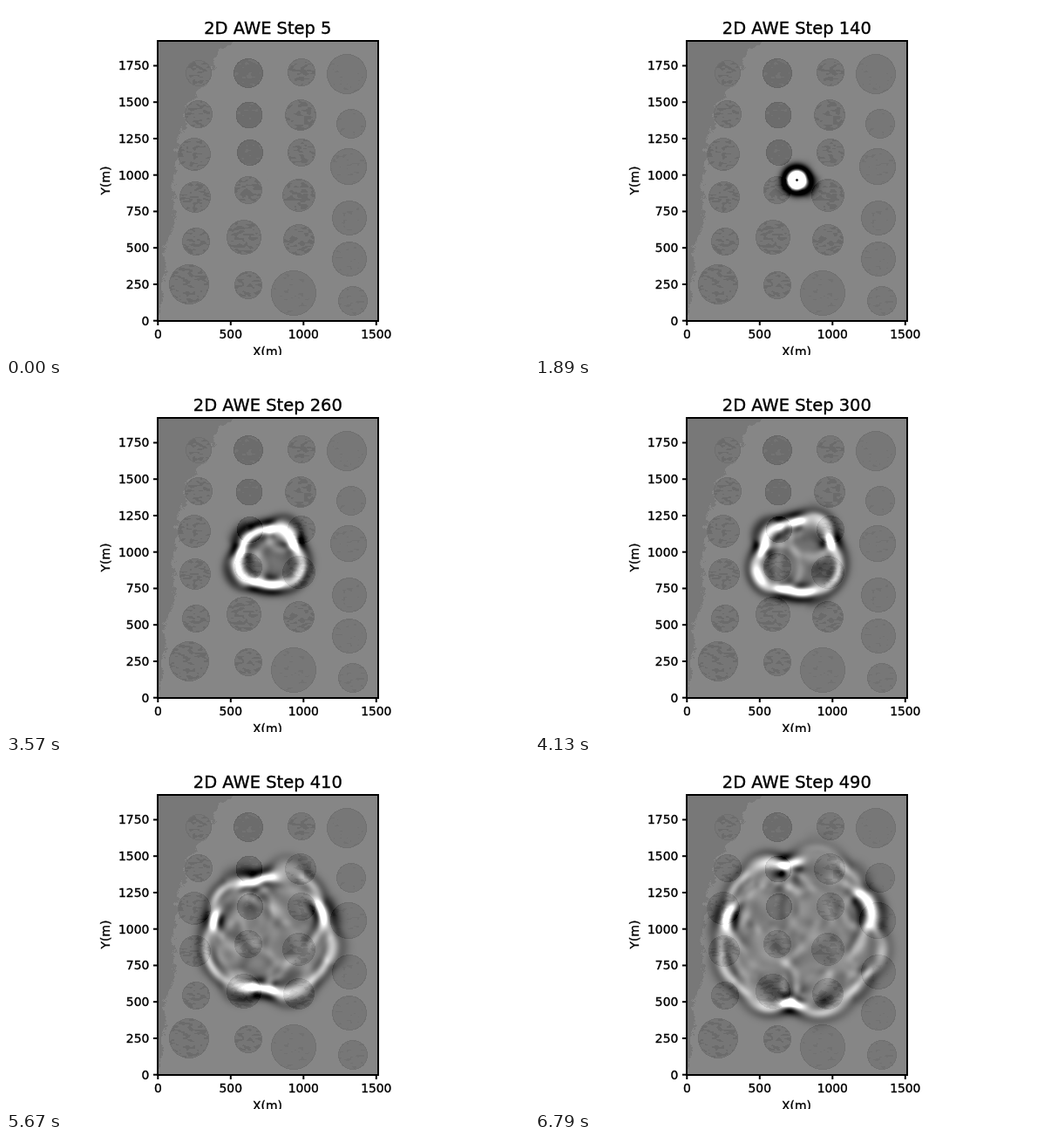
An HTML page with a canvas that plays this animation: 600x400 px, repeating every 6860 ms.

```html
<!DOCTYPE html>
<html lang="en">
<head>
<meta charset="utf-8">
<title>2D acoustic wave</title>
<style>
  html, body { margin: 0; width: 100%; height: 100%; overflow: hidden; background: #fff; }
  canvas { position: absolute; left: 175px; top: 41px; }
  svg { position: absolute; left: 0; top: 0; font-family: "DejaVu Sans", sans-serif; }
  text { stroke: #000; stroke-width: .35px; }
</style>
</head>
<body>
<canvas id="field" width="252" height="320"></canvas>
<svg id="axes" width="600" height="400" viewBox="0 0 600 400"></svg>
<script>
const W = 252, H = 320, LEFT = 175, TOP = 41;
const FRAMES = 98, HOLD = 70, STRIDE = 5;
const PULSE = { x: 125, y: 158 };

// Inclusions by column: centre x, centre y, radius, kind
const LIGHT = 0, MID = 1, DARK = 2;
const discs = [
  [221, 77, 15, MID], [221, 124, 16, MID], [216, 170, 19, MID],
  [217, 219, 18, MID], [218, 270, 16, MID], [210, 319, 23, MID],
  [278, 77, 17, DARK], [279, 125, 15.5, DARK], [280, 168, 15, DARK],
  [278, 211, 16, MID], [273, 265, 20, MID], [278, 320, 16, MID],
  [339, 76, 16, MID], [338, 125, 18, MID], [339, 168, 16, MID],
  [336, 217, 19, MID], [336, 268, 18, MID], [330, 329, 26, LIGHT],
  [391, 78, 23, LIGHT], [396, 135, 17, LIGHT], [393, 184, 21, LIGHT],
  [394, 243, 20, LIGHT], [394, 290, 20, LIGHT], [398, 338, 17, LIGHT]
];
const discSpeed = [0.25, 0.3, 0.34];
const discTone = [119, 118, 108];
const spotTone = [113, 107, 115];
const spotLevel = [0.8, 0.6, 0.72];

// Edge of the darker zone on the left: y, x
const shore = [[40, 264], [50, 246], [60, 239], [72, 238], [85, 232], [100, 221],
  [115, 206], [130, 205], [150, 200], [165, 195], [185, 197], [205, 192],
  [240, 195], [255, 192], [266, 184], [290, 181], [340, 180], [352, 175], [362, 174]];

function shoreAt(y) {
  let i = 0;
  while (shore[i + 1][0] < y) i++;
  const [y0, x0] = shore[i], [y1, x1] = shore[i + 1];
  return x0 + (x1 - x0) * (y - y0) / (y1 - y0);
}

function hash(x, y) {
  let h = Math.imul(x, 374761393) + Math.imul(y, 668265263);
  h = Math.imul(h ^ (h >>> 13), 1274126177);
  return ((h ^ (h >>> 16)) >>> 0) / 4294967296;
}

function noise(x, y) {
  const i = Math.floor(x), j = Math.floor(y), u = x - i, v = y - j;
  const a = hash(i, j) * (1 - u) + hash(i + 1, j) * u;
  const b = hash(i, j + 1) * (1 - u) + hash(i + 1, j + 1) * u;
  return a * (1 - v) + b * v;
}

// The backdrop shows the model; the wave travels through its mirror image.
function buildModel() {
  const tone = new Float32Array(W * H), speed2 = new Float32Array(W * H);
  for (let j = 0; j < H; j++) {
    for (let i = 0; i < W; i++) {
      const x = i + LEFT + 0.5, y = j + TOP + 0.5;
      const rough = (noise(x / 5, y / 5) - 0.5) * 10 + (hash(i, j) - 0.5) * 3;
      let g = x < shoreAt(y) + rough ? 120 : 134;
      let c = 0.197 + 0.03 * (1 - i / W);
      for (const [cx, cy, r, kind] of discs) {
        const d = Math.hypot(x - cx, y - cy);
        if (d > r) continue;
        const spot = noise(x / 4 + 50, y / 1.9) > spotLevel[kind];
        g = d > r - 1 ? discTone[kind] - 7 : spot ? spotTone[kind] : discTone[kind];
        c = discSpeed[kind];
      }
      tone[j * W + i] = g;
      speed2[j * W + W - 1 - i] = c * c;
    }
  }
  return { tone, speed2 };
}

function ricker(n) {
  const a = (Math.PI * 0.0098 * (n - 100)) ** 2;
  return (1 - 2 * a) * Math.exp(-a);
}

// Second-order finite differences, one snapshot every STRIDE steps
function simulate(speed2) {
  let prev = new Float32Array(W * H), cur = new Float32Array(W * H);
  const shots = [];
  for (let n = 1; n <= FRAMES * STRIDE; n++) {
    for (let j = 1; j < H - 1; j++) {
      for (let k = j * W + 1, end = j * W + W - 1; k < end; k++) {
        const p = cur[k];
        const lap = cur[k - 1] + cur[k + 1] + cur[k - W] + cur[k + W] - 4 * p;
        prev[k] = 2 * p - prev[k] + speed2[k] * lap;
      }
    }
    prev[PULSE.y * W + PULSE.x] += ricker(n);
    [prev, cur] = [cur, prev];
    if (n % STRIDE === 0) shots.push(cur.slice());
  }
  return shots;
}

// Gain set from the young ring, away from its centre
function findGain(shot) {
  let peak = 0;
  shot.forEach((p, k) => {
    const far = Math.hypot(k % W - PULSE.x, Math.floor(k / W) - PULSE.y) > 8;
    if (far && p > peak) peak = p;
  });
  return 2.4 * 130 / peak;
}

const svg = document.getElementById("axes");
function add(name, attrs, label) {
  const el = document.createElementNS("http://www.w3.org/2000/svg", name);
  for (const key in attrs) el.setAttribute(key, attrs[key]);
  if (label !== undefined) el.textContent = label;
  return svg.appendChild(el);
}
function write(label, x, y, anchor, size = 13.89, extra = {}) {
  return add("text", { x, y, "text-anchor": anchor, "font-size": size, ...extra }, label);
}
function line(d) {
  add("path", { d, fill: "none", stroke: "#000", "stroke-width": 2 });
}

const SCALE = 0.167;
line("M174 40H427V361H174Z");
for (let m = 0; m <= 1500; m += 500) {
  const x = 174.3 + m * SCALE;
  line(`M${x} 361v5`);
  write(m, x, 381, "middle");
}
for (let m = 0; m <= 1750; m += 250) {
  const y = 360.7 - m * SCALE;
  line(`M174 ${y}h-5`);
  write(m, 164.3, y + 5, "end");
}
write("X(m)", 300, 401, "middle");
write("Y(m)", 0, 0, "middle", 13.89, { transform: "translate(119 200) rotate(-90)" });
const title = write("", 300.3, 32, "middle", 19.44);

const { tone, speed2 } = buildModel();
const shots = simulate(speed2);
const gain = findGain(shots[27]);
const ctx = document.getElementById("field").getContext("2d");
const image = ctx.createImageData(W, H);

function draw(index) {
  const shot = shots[index], px = image.data;
  for (let k = 0, o = 0; k < W * H; k++, o += 4) {
    px[o] = px[o + 1] = px[o + 2] = tone[k] + gain * shot[k];
    px[o + 3] = 255;
  }
  ctx.putImageData(image, 0, 0);
  title.textContent = "2D AWE Step " + (index + 1) * STRIDE;
}

let start = null, shown = 0;
draw(0);
function tick(now) {
  if (start === null) start = now;
  const index = Math.floor((now - start) / HOLD) % FRAMES;
  if (index !== shown) draw(shown = index);
  requestAnimationFrame(tick);
}
requestAnimationFrame(tick);
</script>
</body>
</html>
```
